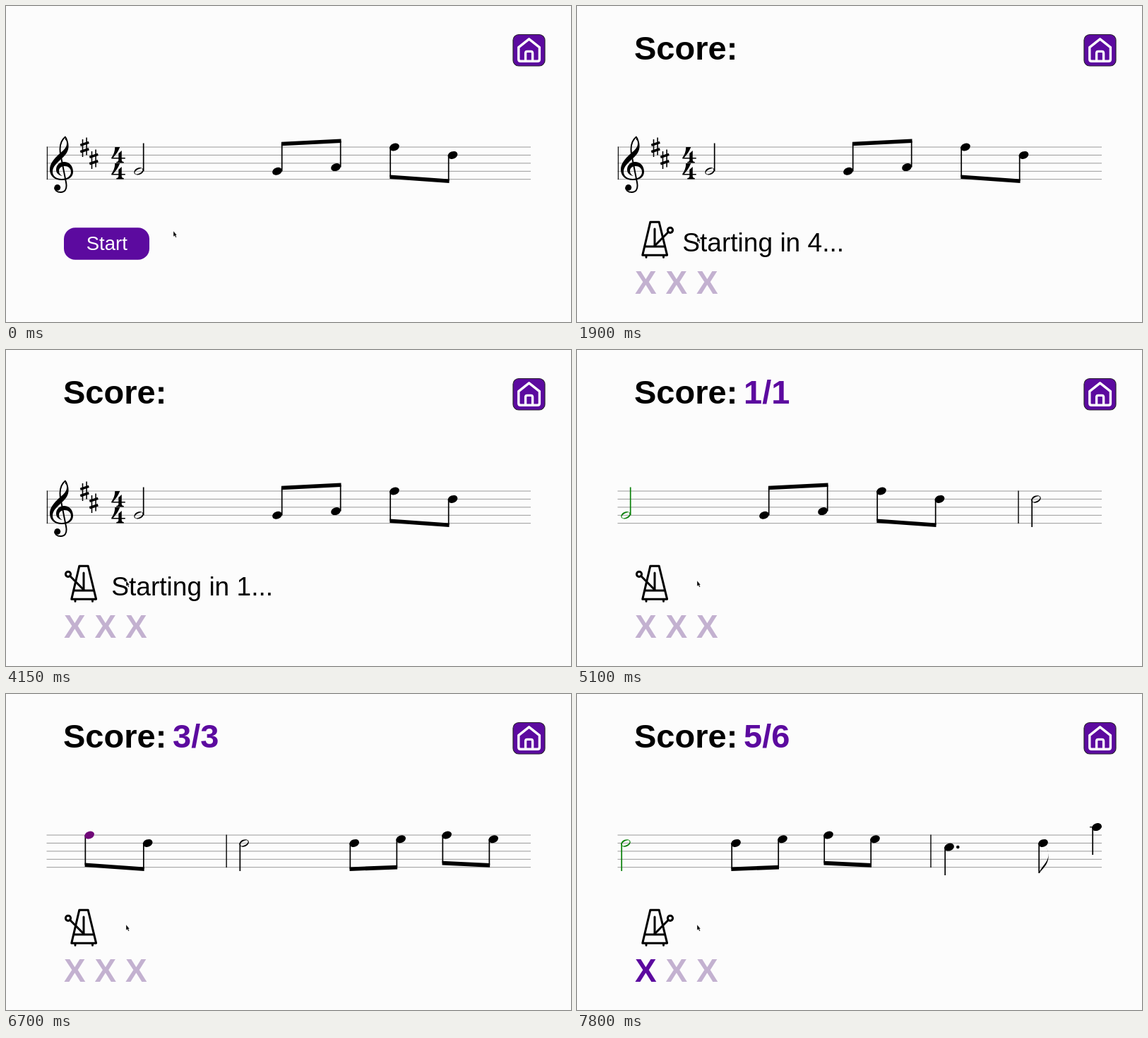
Write an HTML page that moves like this. It is 800 px wide and 448 px high and loops after 8000 ms.

```html
<!DOCTYPE html>
<html lang="en">
<head>
<meta charset="utf-8">
<title>Sight reading</title>
<style>
  html, body { margin: 0; width: 100%; height: 100%; overflow: hidden; background: #fcfcfc; }
  svg { display: block; width: 100%; height: 100%; font-family: "Liberation Sans", Arial, sans-serif; }
  .big { font-size: 47px; font-weight: bold; }
  .miss { font-size: 46px; font-weight: bold; }
</style>
</head>
<body>
<svg viewBox="0 0 800 448">
  <defs>
    <clipPath id="window"><rect x="57.5" y="150" width="685.5" height="140"/></clipPath>
    <path id="four" d="M5 0H12C10 6 6 11 2.5 15H10V9L14.5 5V15H19.5V16.6H14.5V18C14.5 20 15.5 21 17.5 21V22.5H7V21C9 21 10 20 10 18V16.6H0V15C3 11 5 6 5 0Z"/>
    <g id="sharp">
      <path d="M-2.8 -11V14M2.8 -13.5V11.5" stroke="#000" stroke-width="1.6"/>
      <path d="M-6 -2.6L6 -6.6M-6 6.8L6 2.8" stroke="#000" stroke-width="3.6"/>
    </g>
  </defs>

  <path d="M57.5 200H743M57.5 211.4H743M57.5 222.9H743M57.5 234.3H743M57.5 245.7H743" stroke="#999" stroke-width="1"/>
  <g clip-path="url(#window)">
    <g id="score">
      <path d="M58.3 199.5V246" stroke="#000" stroke-width="1.3"/>
      <path d="M83.5 184C86 186 89 193 88.5 200C88 209 81 214 76 219C70 224.5 66 229 66 235C66 241 71 245 79 245C87 245 92 241 92 235C92 230.5 88 227 83 227C78 227 75 230 75 234C75 237.5 77 239.5 80 241C74.5 240 71 237 71 232C71 225.5 76 221 82 221C90 221 95 227 95 235C95 243 88 247 79 247C69 247 62 241 62 232C62 223 68 217 74 211C81 205 86 201 86 195C86 192 85.5 190 84 190Z"/>
      <path d="M84 185.5C77 191 75.5 201 77.3 211L85 250C87 260 83 264 77.5 264C72 264 69 261 69 257.5" fill="none" stroke="#000" stroke-width="2"/>
      <circle cx="72.8" cy="257.3" r="4.4"/>
      <use href="#sharp" x="111.3" y="200"/>
      <use href="#sharp" x="124.3" y="217"/>
      <use href="#four" x="149.3" y="200"/>
      <use href="#four" x="149.3" y="223"/>
    </g>
  </g>

  <rect x="718" y="40.5" width="45" height="44.5" rx="8" fill="#5c0a9f" stroke="#2a2230" stroke-width="1.2"/>
  <path d="M740.6 46.8L725.8 58.6V75.5Q725.8 78.3 728.6 78.3H752.6Q755.4 78.3 755.4 75.5V58.6ZM735.6 78V67Q735.6 64.4 738 64.4H743.2Q745.6 64.4 745.6 67V78" fill="none" stroke="#fff" stroke-width="3.4" stroke-linejoin="round"/>

  <g id="button">
    <rect x="82" y="314.3" width="121" height="45.4" rx="16" fill="#5c0a9f"/>
    <text x="142.8" y="346.3" font-size="27.5" fill="#fff" text-anchor="middle">Start</text>
  </g>

  <g id="game">
    <text class="big" x="81" y="76">Score:</text>
    <text class="big" id="points" x="236" y="76" fill="#5c0a9f"></text>
    <g fill="none" stroke="#000" stroke-width="3" stroke-linecap="round" stroke-linejoin="round">
      <path d="M103.8 306.3H116.2L127.6 353.2H92.8ZM96 341H124.5M110 316V340M98 354V356.3M122.5 354V356.3"/>
      <g id="arm"><path d="M110 340L128.8 321"/><circle cx="132" cy="317.8" r="3.6" fill="#fcfcfc"/></g>
    </g>
    <text id="count" x="149.3" y="348" font-size="37.1"></text>
    <text class="miss" id="miss" x="82" y="408">X</text>
    <text class="miss" x="125.5" y="408" fill="#c3b1d0">X</text>
    <text class="miss" x="169" y="408" fill="#c3b1d0">X</text>
  </g>

  <path id="cursor" d="M0 0V8L1.8 6.5L3.2 9.2L4.5 8.5L3.2 6H5Z" stroke="#fff" stroke-width=".4"/>
</svg>
<script>
const $ = id => document.getElementById(id);
const NS = 'http://www.w3.org/2000/svg';
const LOOP = 8000, READY = 1350, BEAT0 = 1380, BEAT = 740;
const GO = BEAT0 + 4 * BEAT, RESUME = 5494, SPEED = 0.2592;
const STOP1 = 119, STOP2 = 700, HIT_X = 69.5;
const PURPLE = '#5c0a9f', PALE = '#c3b1d0';

function add(tag, attrs, parent = $('score')) {
  const el = document.createElementNS(NS, tag);
  for (const k in attrs) el.setAttribute(k, attrs[k]);
  parent.appendChild(el);
  return el;
}

// Head and stem; stems that end below the head sit on its left side.
function note(x, y, end, half) {
  const g = add('g', {});
  const sx = x + (end < y ? 6.7 : -5.8);
  const stem = add('path', { d: `M${sx} ${y}V${end}`, 'stroke-width': 1.7 }, g);
  const turn = `translate(${x} ${y}) rotate(-22)`;
  const head = half
    ? add('path', { d: 'M-7 0A7 4.9 0 1 1 7 0A7 4.9 0 1 1 -7 0ZM-5.8 .8A6 2.5 -8 1 0 5.8 -.8A6 2.5 -8 1 0 -5.8 .8Z', 'fill-rule': 'evenodd', transform: turn }, g)
    : add('ellipse', { rx: 7.1, ry: 5.2, transform: turn }, g);
  stem.setAttribute('stroke', '#000');
  return { x, paint(c) { head.setAttribute('fill', c); if (half) stem.setAttribute('stroke', c); } };
}

function pair(x1, y1, x2, y2, b1, b2) {
  const notes = [note(x1, y1, b1), note(x2, y2, b2)];
  const off = b1 < y1 ? 6.7 : -5.8;
  const l = x1 + off - .8, r = x2 + off + .8;
  add('path', { d: `M${l} ${b1 - 2.8}L${r} ${b2 - 2.8}V${b2 + 2.8}L${l} ${b1 + 2.8}Z` });
  return notes;
}

const bar = x => add('path', { d: `M${x} 199.5V246`, stroke: '#000', 'stroke-width': 1.4 });

const notes = [
  note(188, 234.3, 194.5, true),
  ...pair(384, 234.3, 467, 228.6, 195.5, 191.3),
  ...pair(550, 200, 632.5, 211.4, 242.3, 248.2),
  note(769, 211.4, 251, true),
];
bar(744);
pair(925, 211.4, 991, 205.7, 248.2, 245.6);
pair(1056, 200, 1122, 205.7, 239.6, 242.9);
bar(1201);
note(1227, 217.1, 257);
add('circle', { cx: 1239.3, cy: 217, r: 2.3 });
note(1360, 211.4, 254);
add('path', { d: 'M1354.2 254C1356 246 1367 239 1367.4 229C1367.6 224 1366 220 1364 217C1370 227 1368 238 1362 245C1359 249 1356 251 1355 254Z' });
note(1436, 188.6, 228);
add('path', { d: 'M1426 188.6H1446', stroke: '#000', 'stroke-width': 1.2 });

const MISSED = 3;
const clamp = v => Math.max(0, Math.min(1, v));
const ease = v => { v = clamp(v); return v * v * (3 - 2 * v); };
const show = (el, on) => el.setAttribute('visibility', on ? 'visible' : 'hidden');

function scroll(t) {
  if (t < GO) return 0;
  if (t < RESUME) return Math.min(STOP1, (t - GO) * SPEED);
  return Math.min(STOP2, STOP1 + (t - RESUME) * SPEED);
}

function draw(t) {
  const playing = t >= READY;
  const shift = scroll(t);
  const done = notes.filter(n => n.x - shift <= HIT_X).length;
  const moving = t >= GO && (done !== 1 || t >= RESUME);
  const missed = done > MISSED;

  $('score').setAttribute('transform', `translate(${-shift} 0)`);
  notes.forEach((n, i) => n.paint(
    i < done ? (i === MISSED ? '#c00000' : '#0a800a')
    : i === done && moving ? '#700878' : '#000'));

  show($('button'), !playing);
  show($('game'), playing);
  const grow = 1 + .05 * (ease((t - 300) / 200) - ease((t - 860) / 90));
  $('button').setAttribute('transform', `translate(142.5 337) scale(${grow}) translate(-142.5 -337)`);

  const beat = Math.max(0, Math.floor((t - BEAT0) / BEAT));
  $('arm').setAttribute('transform', beat % 2 ? 'translate(220 0) scale(-1 1)' : '');
  $('count').textContent = t < GO ? `Starting in ${4 - beat}...` : '';
  $('points').textContent = done ? `${done - (missed ? 1 : 0)}/${done}` : '';
  $('miss').setAttribute('fill', missed ? PURPLE : PALE);

  const m = ease((t - 20) / 680);
  $('cursor').setAttribute('transform', `translate(${237 - 67 * m} ${319 + 8 * m})`);
}

const start = performance.now();
function frame() {
  draw((performance.now() - start) % LOOP);
  requestAnimationFrame(frame);
}
frame();
</script>
</body>
</html>
```
